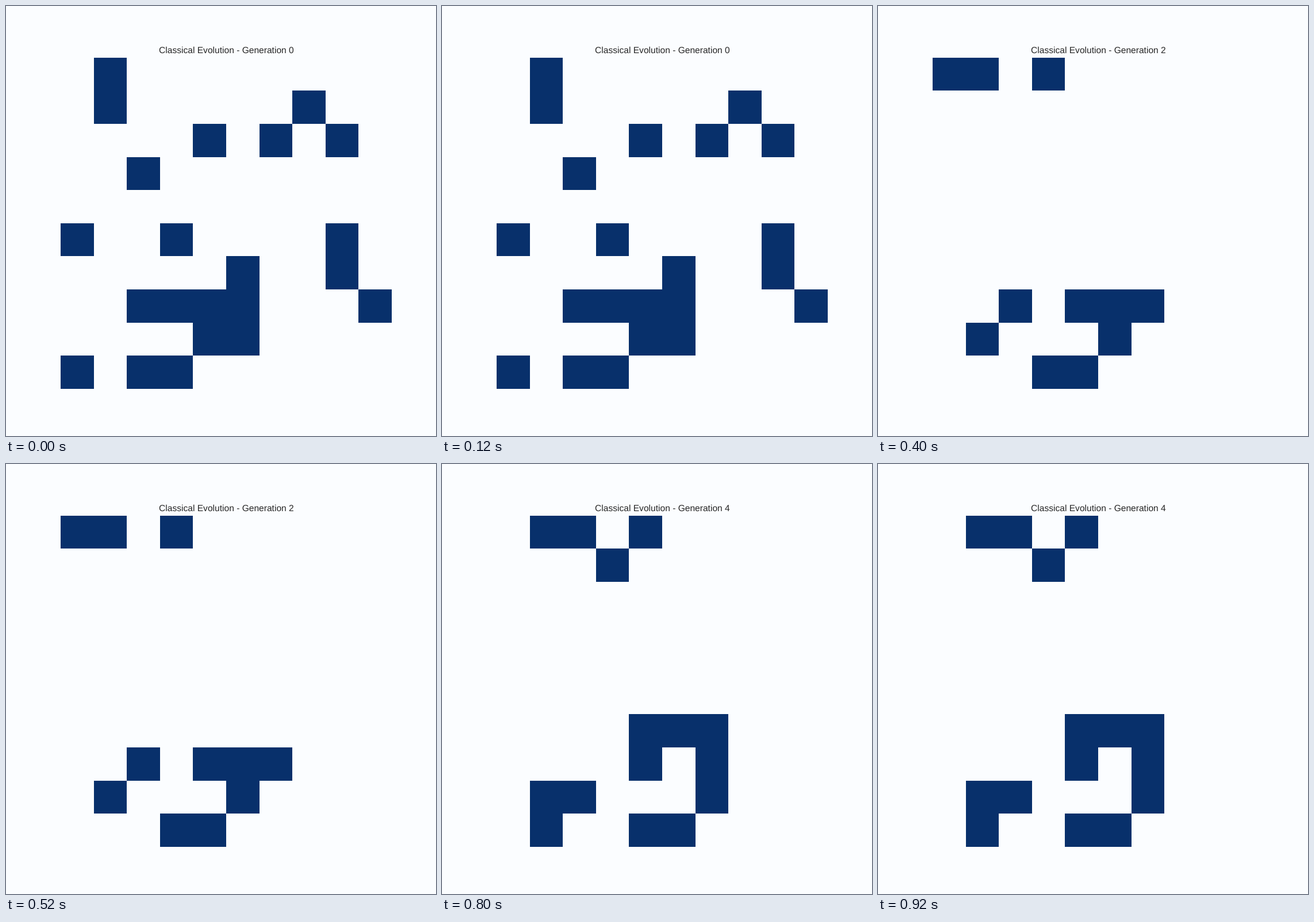
Recreate the animation shown at these times as an HTML page. Size 748x748 px, loop 1000 ms.

```html
<!DOCTYPE html>
<html lang="en">
<head>
<meta charset="utf-8">
<title>Classical Evolution</title>
<style>
  html, body { margin: 0; width: 100%; height: 100%; overflow: hidden; background: #fbfdff; }
  svg { display: block; width: 748px; height: 748px; }
  path { fill: #08306b; shape-rendering: crispEdges; }
  text {
    font: 15.58px "Liberation Sans", Arial, sans-serif;
    fill: #262626;
    text-anchor: middle;
    text-rendering: geometricPrecision;
  }
</style>
</head>
<body>
<svg viewBox="0 0 748 748">
  <path id="cells"/>
  <text id="title" x="383.4" y="82"></text>
</svg>
<script>
  const SIZE = 10, CELL = 57.6, LEFT = 95, TOP = 89.8;
  const STEP = 200, COUNT = 5;
  const seed = [
    ".#........",
    ".#.....#..",
    "....#.#.#.",
    "..#.......",
    "..........",
    "#..#....#.",
    ".....#..#.",
    "..####...#",
    "....##....",
    "#.##......"
  ].map(row => [...row].map(c => +(c === "#")));

  const wrap = i => (i + SIZE) % SIZE;

  function neighbours(grid, r, c) {
    let sum = -grid[r][c];
    for (let dr = -1; dr <= 1; dr++)
      for (let dc = -1; dc <= 1; dc++) sum += grid[wrap(r + dr)][wrap(c + dc)];
    return sum;
  }

  // Game of Life on a torus
  function evolve(grid) {
    return grid.map((row, r) => row.map((alive, c) => {
      const n = neighbours(grid, r, c);
      return +(n === 3 || (alive && n === 2));
    }));
  }

  const xAt = c => Math.round(LEFT + c * CELL);
  const yAt = r => Math.round(TOP + r * CELL);

  function outline(grid) {
    let d = "";
    grid.forEach((row, r) => row.forEach((alive, c) => {
      if (alive) d += `M${xAt(c)} ${yAt(r)}H${xAt(c + 1)}V${yAt(r + 1)}H${xAt(c)}Z`;
    }));
    return d;
  }

  const shapes = [];
  for (let g = 0, grid = seed; g < COUNT; g++, grid = evolve(grid)) shapes.push(outline(grid));

  const cells = document.getElementById("cells");
  const title = document.getElementById("title");
  let shown = -1;

  function show(gen) {
    if (gen === shown) return;
    shown = gen;
    cells.setAttribute("d", shapes[gen]);
    title.textContent = `Classical Evolution - Generation ${gen}`;
  }

  const start = performance.now();
  function tick() {
    show(Math.floor((performance.now() - start) / STEP) % COUNT);
    requestAnimationFrame(tick);
  }
  tick();
</script>
</body>
</html>
```
